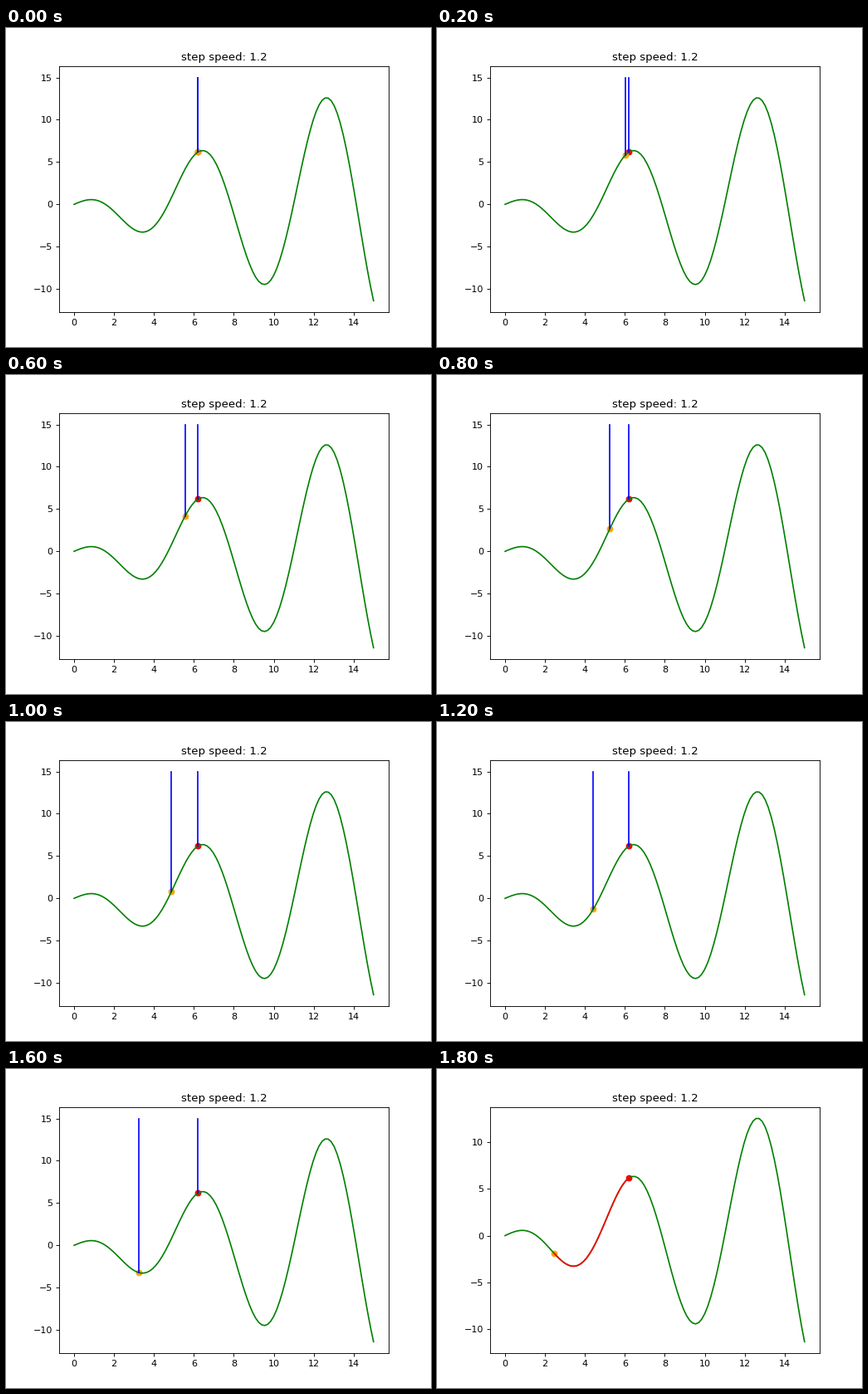
A matplotlib script for the animation above (2.8 s loop, 512 px wide and 384 px high).

```python
import numpy as np
import matplotlib.pyplot as plt
from matplotlib.animation import FuncAnimation

STEP_SPEED = 1.2
FIRST_STEP = 0.18
TOP = 15
MOVES = 9            # the last position is then held
FRAMES = 14
INTERVAL = 200

xs = np.linspace(0, 15, 100)
start = xs[41]


def curve(x):
    return x * np.cos(x)


def position(n):
    """Start minus a geometric series of growing steps."""
    return start - FIRST_STEP * (STEP_SPEED**n - 1) / (STEP_SPEED - 1)


fig, ax = plt.subplots(figsize=(6.4, 4.8), dpi=80)


def draw(frame):
    n = min(frame, MOVES)
    x = position(n)
    ax.clear()
    ax.set_title(f"step speed: {STEP_SPEED}")
    ax.plot(xs, curve(xs), color="g")
    ax.scatter(start, curve(start), color="r")
    ax.scatter(x, curve(x), color="orange")
    if n < MOVES:
        for px in (start, x):
            ax.plot([px, px], [curve(px), TOP], color="b")
    else:
        trail = np.linspace(x, start, 100)
        ax.plot(trail, curve(trail), color="r")


anim = FuncAnimation(fig, draw, frames=FRAMES, interval=INTERVAL,
                     init_func=lambda: draw(0), repeat=True, repeat_delay=0)
plt.show()
```
